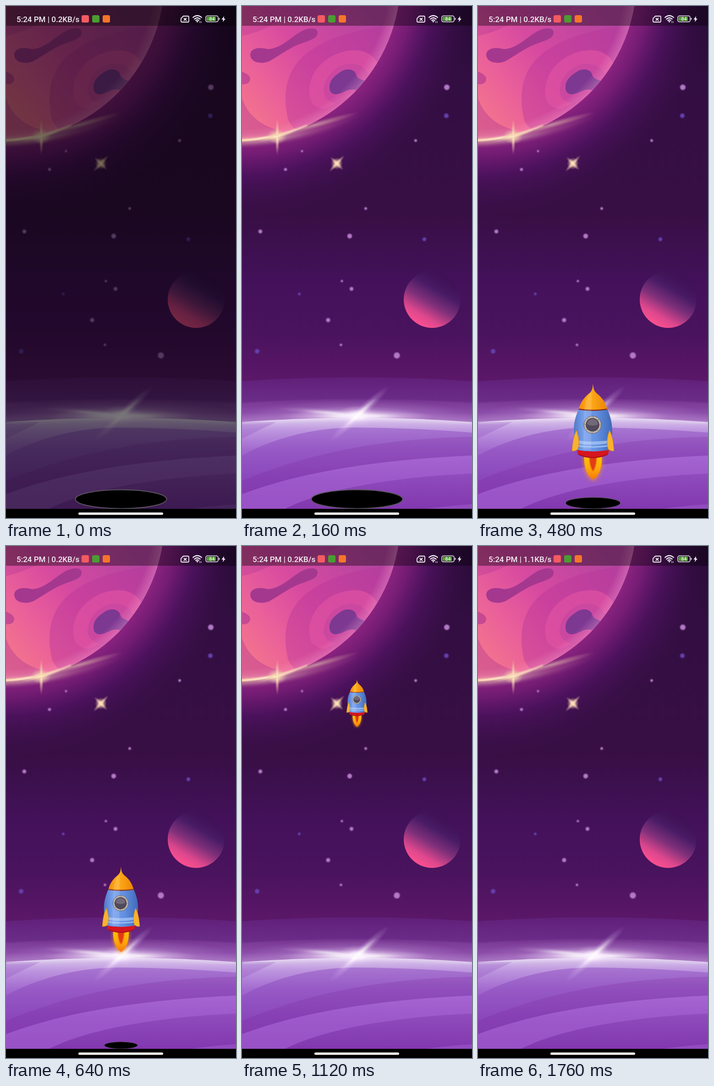
These frames come from a looping animation (502 by 1115 pixels, 1.84 s). An HTML page:

```html
<!DOCTYPE html>
<html lang="en">
<head>
<meta charset="utf-8">
<title>Rocket launch</title>
<style>
html, body { margin: 0; height: 100%; overflow: hidden; background: #000; }
svg { display: block; width: 502px; height: 1115px; }
text { font-family: Roboto, sans-serif; font-weight: 500; fill: #f3eef5; }
</style>
</head>
<body>
<svg viewBox="0 0 502 1115">
  <defs>
    <linearGradient id="sky" x2="0" y2="1">
      <stop offset="0" stop-color="#270a36"/><stop offset=".2" stop-color="#330e42"/>
      <stop offset=".55" stop-color="#380f45"/><stop offset=".72" stop-color="#43115a"/>
      <stop offset=".86" stop-color="#4a135e"/><stop offset=".98" stop-color="#5b1768"/>
    </linearGradient>
    <radialGradient id="halo" gradientUnits="userSpaceOnUse" cx="-5" cy="-58" r="530">
      <stop offset=".66" stop-color="#8a237f"/><stop offset=".72" stop-color="#741c74"/>
      <stop offset=".81" stop-color="#4f1260" stop-opacity=".85"/><stop offset="1" stop-color="#360f45" stop-opacity="0"/>
    </radialGradient>
    <linearGradient id="giant" gradientUnits="userSpaceOnUse" x1="0" y1="260" x2="290" y2="30">
      <stop offset="0" stop-color="#f5788a"/><stop offset=".28" stop-color="#ea609a"/>
      <stop offset=".55" stop-color="#d74aa0"/><stop offset="1" stop-color="#b444a0"/>
    </linearGradient>
    <radialGradient id="limb" gradientUnits="userSpaceOnUse" cx="-5" cy="-58" r="351">
      <stop offset=".93" stop-color="#ffb4d8" stop-opacity="0"/><stop offset="1" stop-color="#ffb4d8" stop-opacity=".3"/>
    </radialGradient>
    <linearGradient id="dawn" gradientUnits="userSpaceOnUse" x1="0" y1="0" x2="260" y2="0">
      <stop offset="0" stop-color="#ffdcb4"/><stop offset=".3" stop-color="#fff3cf"/>
      <stop offset=".6" stop-color="#f0b4b4" stop-opacity=".5"/><stop offset="1" stop-color="#e090b8" stop-opacity="0"/>
    </linearGradient>
    <linearGradient id="moon" gradientUnits="userSpaceOnUse" x1="381" y1="694" x2="444" y2="588">
      <stop offset="0" stop-color="#ff5190"/><stop offset=".2" stop-color="#dd478d"/>
      <stop offset=".45" stop-color="#80307a"/><stop offset=".7" stop-color="#4a1c66"/>
      <stop offset="1" stop-color="#3b1150" stop-opacity=".2"/>
    </linearGradient>
    <linearGradient id="haze" x2="0" y2="1">
      <stop offset="0" stop-color="#602079"/><stop offset=".5" stop-color="#6b2c89"/><stop offset="1" stop-color="#8d50ac"/>
    </linearGradient>
    <linearGradient id="haze2" x2="0" y2="1">
      <stop offset="0" stop-color="#74348f"/><stop offset=".5" stop-color="#8b4ca9"/><stop offset="1" stop-color="#b98bd0"/>
    </linearGradient>
    <linearGradient id="ground" x2="0" y2="1">
      <stop offset="0" stop-color="#dccaec"/><stop offset=".14" stop-color="#bd95df"/>
      <stop offset=".35" stop-color="#a269ce"/><stop offset=".65" stop-color="#8e4abb"/><stop offset="1" stop-color="#8237ae"/>
    </linearGradient>
    <radialGradient id="white">
      <stop offset="0" stop-color="#fff"/><stop offset=".25" stop-color="#fff" stop-opacity=".75"/>
      <stop offset=".6" stop-color="#f5dcff" stop-opacity=".25"/><stop offset="1" stop-color="#f0d0ff" stop-opacity="0"/>
    </radialGradient>
    <radialGradient id="cream">
      <stop offset="0" stop-color="#fff3cc"/><stop offset=".4" stop-color="#f7d8b0" stop-opacity=".65"/>
      <stop offset="1" stop-color="#e8b0a8" stop-opacity="0"/>
    </radialGradient>
    <linearGradient id="gold">
      <stop offset="0" stop-color="#f48a08"/><stop offset=".35" stop-color="#ffad1c"/><stop offset="1" stop-color="#ed8504"/>
    </linearGradient>
    <linearGradient id="hull">
      <stop offset="0" stop-color="#4f78c6"/><stop offset=".25" stop-color="#78a0ec"/>
      <stop offset=".6" stop-color="#628fe0"/><stop offset="1" stop-color="#4068b8"/>
    </linearGradient>
    <linearGradient id="fire" x2="0" y2="1">
      <stop offset="0" stop-color="#ffc400"/><stop offset=".5" stop-color="#ffad08"/><stop offset="1" stop-color="#f5780c"/>
    </linearGradient>
    <filter id="soft" x="-50%" y="-50%" width="200%" height="200%"><feGaussianBlur stdDeviation="1"/></filter>
    <filter id="blur" x="-50%" y="-50%" width="200%" height="200%"><feGaussianBlur stdDeviation="4"/></filter>
    <clipPath id="disc"><circle cx="-5" cy="-58" r="351"/></clipPath>
    <clipPath id="land"><path id="hill" d="M0 906Q251 888 502 906V1096H0Z"/></clipPath>
    <clipPath id="screen"><path d="M0 0H502V1095H0Z"/></clipPath>
  </defs>

  <path fill="url(#sky)" d="M0 0H502V830H0Z"/>
  <path fill="url(#halo)" d="M0 0H502V500H0Z"/>

  <g clip-path="url(#disc)">
    <path fill="url(#giant)" d="M0 0H350V300H0Z"/>
    <path fill="#a82f92" opacity=".3" d="M0 0H215C180 18 150 28 115 29C70 30 55 55 0 65Z"/>
    <path fill="#b83598" opacity=".42" d="M100 245C88 190 97 145 132 111C180 66 260 48 350 40V240L180 280C125 280 108 268 100 245Z"/>
    <path fill="#e254a4" opacity=".65" d="M148 199C140 157 168 119 210 103C254 87 286 101 296 126L250 190L180 224C160 222 151 213 148 199Z"/>
    <path fill="#bf449f" opacity=".5" d="M178 183C180 151 210 122 244 126C270 130 280 147 278 163L210 213C190 211 178 201 178 183Z"/>
    <path fill="#bd4293" opacity=".5" d="M0 200C10 233 37 260 80 270L70 285L0 296Z"/>
    <path fill="#a4388f" d="M18 105C20 91 39 89 57 94C84 92 101 73 123 59C143 46 164 45 165 57C166 69 151 74 134 80C105 89 82 108 60 120C45 127 18 125 18 105Z"/>
    <path fill="#7d3892" d="M191 178C190 159 207 149 219 141C235 134 248 140 250 152C253 160 268 161 271 166L249 183C230 178 224 190 207 192C197 193 191 188 191 178Z"/>
    <path fill="#b83f92" opacity=".75" d="M0 143C10 147 18 151 18 160C17 168 8 172 0 170Z"/>
    <circle cx="-5" cy="-58" r="351" fill="url(#limb)"/>
  </g>
  <g fill="none" stroke="url(#dawn)">
    <path d="M-10 296Q130 292 256 235" stroke-width="13" opacity=".5" filter="url(#blur)"/>
    <path d="M-10 293Q70 291 142 260" stroke-width="5" filter="url(#soft)"/>
  </g>
  <g fill="url(#cream)">
    <ellipse cx="76" cy="284" rx="23" ry="17"/>
    <ellipse cx="77" cy="285" rx="5" ry="40"/>
    <ellipse cx="76" cy="284" rx="46" ry="5" transform="rotate(-15 76 284)"/>
    <ellipse cx="160" cy="259" rx="98" ry="8" transform="rotate(-16 160 259)" opacity=".5"/>
    <circle cx="207" cy="343" r="13"/>
    <ellipse cx="207" cy="343" rx="24" ry="5" transform="rotate(-47 207 343)"/>
    <ellipse cx="207" cy="343" rx="20" ry="5" transform="rotate(45 207 343)"/>
  </g>

  <g id="stars" filter="url(#soft)"></g>
  <circle cx="415" cy="639" r="62" fill="url(#moon)"/>

  <path fill="url(#haze)" d="M0 817Q251 800 502 817V910H0Z"/>
  <path fill="url(#haze2)" filter="url(#soft)" d="M-9 865Q251 847 511 865V915H-9Z"/>
  <ellipse cx="251" cy="893" rx="250" ry="36" fill="url(#white)" opacity=".55"/>
  <use href="#hill" fill="url(#ground)"/>
  <g clip-path="url(#land)">
    <path fill="#8a46b8" opacity=".27" d="M0 942Q45 920 75 906H0Z"/>
    <path fill="#8846ba" opacity=".45" d="M0 979C60 946 140 920 240 918Q370 918 502 929V938C340 941 170 963 0 1034Z"/>
    <path fill="#8138ae" opacity=".55" d="M0 1034C170 963 340 941 502 938V979C330 987 150 1007 0 1063Z"/>
    <path fill="#a967d8" opacity=".55" d="M0 1063C150 1007 330 987 502 979V1018C350 1025 190 1047 92 1096H0Z"/>
    <path fill="#a967d8" opacity=".4" d="M395 1096Q450 1088 502 1085V1096Z"/>
    <path fill="none" stroke="#fff" stroke-width="6" opacity=".5" filter="url(#blur)" d="M0 906Q251 888 502 906"/>
  </g>
  <g fill="url(#white)">
    <ellipse cx="251" cy="893" rx="172" ry="13"/>
    <ellipse cx="252" cy="892" rx="44" ry="23"/>
    <ellipse cx="256" cy="888" rx="88" ry="12" transform="rotate(-43 256 888)" opacity=".8"/>
    <ellipse cx="190" cy="886" rx="110" ry="9" transform="rotate(5 190 886)" opacity=".6"/>
  </g>

  <path id="dim" d="M0 0H502V1096H0Z"/>
  <path d="M0 0H502V43H0Z" opacity=".38"/>
  <ellipse id="hole" cx="251" stroke="#5b5360" stroke-width="2"/>

  <g clip-path="url(#screen)">
    <g id="rocket">
      <path fill="#ff9a10" opacity=".65" filter="url(#blur)" d="M-20 158H20C23 185 13 208 0 212C-13 208-23 185-20 158Z"/>
      <path fill="url(#fire)" d="M-19 156H19C21 182 12 203 0 209C-12 203-21 182-19 156Z"/>
      <path fill="#e23a12" filter="url(#soft)" d="M-8 156H8C8 172 5 185 0 191C-5 185-8 172-8 156Z"/>
      <path fill="#d6151f" d="M-36 141H36L33 154Q0 169-33 154Z"/>
      <path fill="#a30d18" d="M-33 153Q0 168 33 153L31 156Q0 169-31 156Z"/>
      <path fill="url(#hull)" d="M-31 56Q0 61 31 56C40 75 42 90 42 105C41 125 37 138 34 145Q0 151-34 145C-37 138-41 125-42 105C-42 90-40 75-31 56Z"/>
      <path fill="#b4d0fa" opacity=".65" d="M-40 123Q0 130 40 123L39 130Q0 137-39 130ZM-38 133Q0 140 38 133L37 137Q0 143-37 137Z"/>
      <path fill="url(#gold)" d="M0 0C1 15 4 18 10 23C22 33 28 44 31 56Q0 61-31 56C-28 44-22 33-10 23C-4 18-1 15 0 0Z"/>
      <path fill="none" stroke="#8c3418" stroke-width="2.5" d="M-31 56Q0 61 31 56"/>
      <path fill="#fff" opacity=".13" d="M-6 22C-15 34-18 45-19 57L-21 143L-4 146L-3 20Z"/>
      <g fill="#f9b22e" stroke="#c87e12" stroke-width=".8">
        <path id="fin" d="M-36 102C-41 112-44 122-46 147Q-38 148-33 143C-29 129-31 115-36 102Z"/>
        <use href="#fin" transform="scale(-1 1)"/>
      </g>
      <circle cx="-1" cy="90" r="19" fill="#bbb5ac" stroke="#655f66" stroke-width="1"/>
      <circle cx="-1" cy="90" r="16.5" fill="none" stroke="#6a6468" stroke-width="1.5" stroke-dasharray="1.5 11.46"/>
      <circle cx="-1" cy="90" r="14" fill="#51495c" stroke="#39333f" stroke-width="1.2"/>
      <path fill="#827988" opacity=".65" d="M-13 89A12 12 0 0 1 11 89Q-1 95-13 89Z"/>
    </g>
  </g>

  <text id="clock" x="23" y="35" font-size="17"></text>
  <rect x="165" y="20" width="16" height="16" rx="3.5" fill="#f35b62"/>
  <rect x="188" y="20" width="16" height="16" rx="3.5" fill="#4b9c32"/>
  <rect x="211" y="20" width="16" height="16" rx="3.5" fill="#f5752a"/>
  <g fill="none" stroke="#f3eef5" stroke-width="1.8">
    <path d="M387 22H397Q399 22 399 24V33Q399 35 397 35H384Q382 35 382 33V27Z"/>
    <path d="M388 26L394 32M394 26L388 32"/>
    <path stroke-width="2.3" d="M407.500 25.500Q417.500 16.500 427.500 25.500M410.500 29Q417.500 22.500 424.500 29M413.500 32Q417.500 28.500 421.500 32"/>
    <path stroke-width="1" d="M423 37V33M426 33V37"/>
    <rect x="436" y="21.500" width="27" height="13" rx="3.500" stroke-width="1.500"/>
    <path d="M465.500 26V30"/>
  </g>
  <path fill="#f3eef5" d="M415 33.500Q417.500 31.500 420 33.500L417.500 36ZM476 22L470.500 29.500H474L473 35L479 27.500H475.500Z"/>
  <rect x="438" y="23.500" width="20" height="9" rx="1.500" fill="#53a531"/>
  <text x="449.500" y="32" font-size="10.500" text-anchor="middle">84</text>
  <path d="M0 1095H502V1115H0Z"/>
  <rect x="158" y="1103" width="185" height="5" rx="2.500" fill="#fff"/>
</svg>
<script>
const LOOP = 1840, STEP = 80;
const $ = id => document.getElementById(id);

// x, y, radius; the faint blue ones follow
const pale = [[447,177,6], [379,293,3], [131,316,2.5], [95,356,3.3], [270,441,3], [40,491,4.3], [235,501,5.2],
  [218,599,2.6], [239,616,4.2], [188,684,4.6], [216,738,2.8], [338,761,6.7]];
const blue = [[446,239,5], [398,508,4.2], [125,627,3], [33,752,5]];
const dots = (list, color) => list.map(([x, y, r]) =>
  `<circle cx="${x}" cy="${y}" r="${r}" fill="${color}"/>`).join('');
$('stars').innerHTML = dots(pale, '#b279c6') + dots(blue, '#6540ad');

// time, nose height, scale
const flight = [[160,1100,1.2], [480,822,1], [800,574,.776], [1120,290,.495], [1440,16,.219], [1600,-121,.08]];

function pose(t) {
  const next = flight.findIndex(key => key[0] > t);
  if (next < 1) return [1200, 0];
  const [a, b] = [flight[next - 1], flight[next]];
  const k = (t - a[0]) / (b[0] - a[0]);
  return [1, 2].map(i => a[i] + (b[i] - a[i]) * k);
}

function draw() {
  const t = Math.floor(performance.now() % LOOP / STEP) * STEP;
  const [y, scale] = pose(t);
  $('rocket').setAttribute('transform', `translate(251 ${y}) scale(${scale})`);

  const open = Math.min(1, Math.max(0, (888 - t) / 680));
  const hole = $('hole');
  hole.setAttribute('rx', 99.5 * open);
  hole.setAttribute('ry', 20.5 * open);
  hole.setAttribute('cy', 1095 - 21 * open);
  hole.setAttribute('stroke-width', 2 * open);

  $('dim').setAttribute('opacity', Math.max(0, .53 * (1 - t / 150)));
  $('clock').textContent = `5:24 PM | ${t < 1600 ? '0.2' : '1.1'}KB/s`;
  requestAnimationFrame(draw);
}
draw();
</script>
</body>
</html>
```
